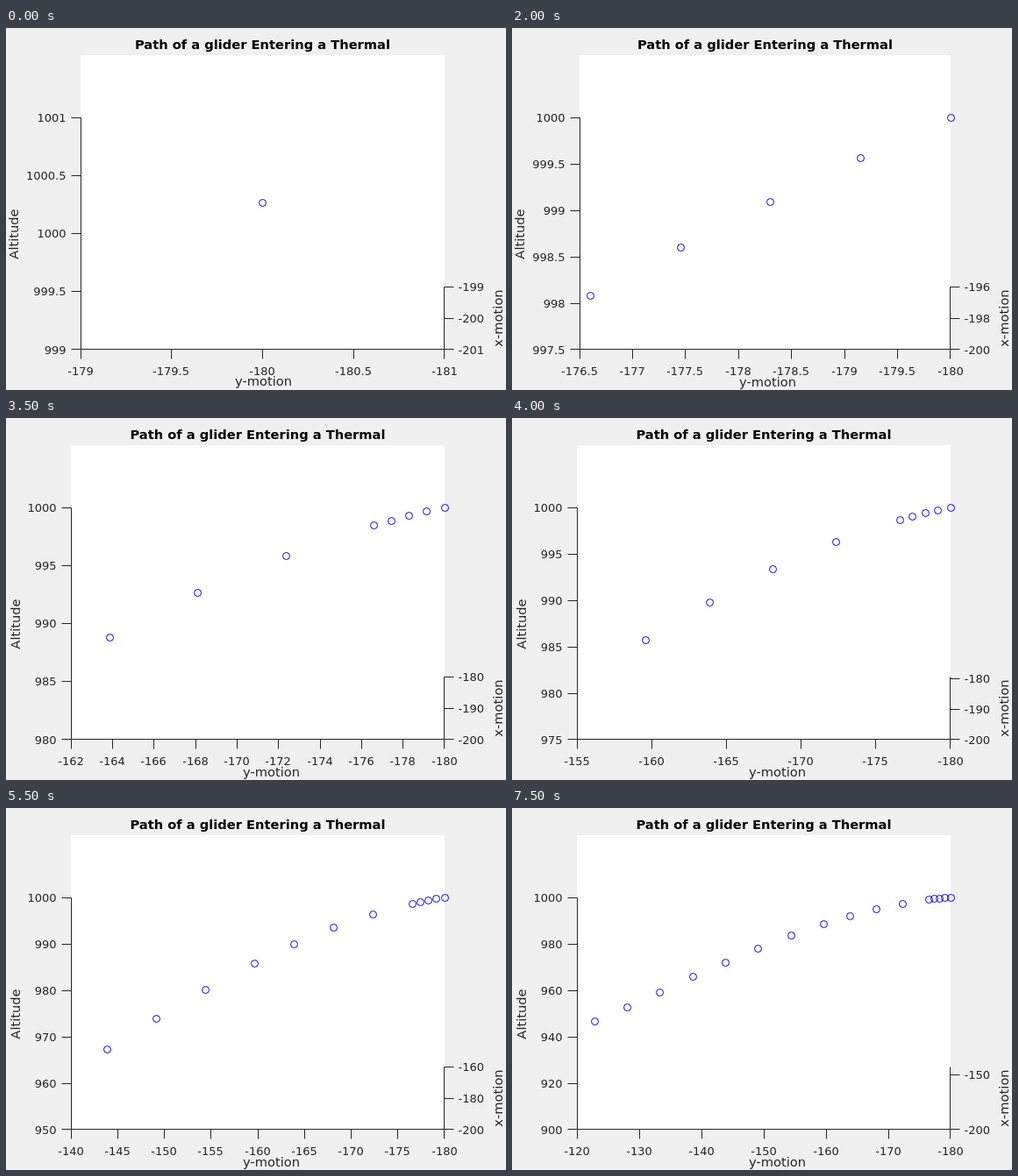
An HTML page that plays this animation: 570x413 px, repeating every 8000 ms.

```html
<!DOCTYPE html>
<html lang="en">
<head>
<meta charset="utf-8">
<title>Path of a glider Entering a Thermal</title>
<style>
html, body { margin: 0; width: 100%; height: 100%; overflow: hidden; background: #f0f0f0; }
svg { display: block; }
text { font: 13px "DejaVu Sans", sans-serif; fill: #262626; }
.label { font-size: 14.67px; text-anchor: middle; }
.title { font-weight: bold; fill: #000; }
path { fill: none; stroke: #262626; }
circle { fill: none; stroke: #00f; }
</style>
</head>
<body>
<svg id="plot" width="570" height="413" viewBox="0 0 570 413"></svg>
<script>
const plot = document.getElementById('plot');
const STEP_MS = 500, STEPS = 16;
const RIGHT = 500, BOTTOM = 367.07, HEIGHT = 265, DEPTH = 71.1;
const NICE = [.1, .2, .5, 1, 2, 5, 10, 20, 50];

// Height lost and distance flown (equal in x and y) at each step
const drops = [0, .579, 1.191, 1.825, 2.49, 6.21, 10.55, 15.55, 21.03,
               28.5, 36.53, 44.91, 53.7, 62.64, 71.7, 80.15];
const travel = i => i < 5 ? .8485 * i
                  : i < 9 ? 3.394 + 4.2426 * (i - 4)
                  : 20.365 + 5.257 * (i - 8);

const roundUp = (v, step) => Math.ceil(v / step - 1e-6) * step;

// Smallest round tick step that covers the data in at most max intervals
function fit(data, max) {
  const step = NICE.find(s => Math.ceil(data / s - 1e-6) <= max);
  return { range: roundUp(data, step), step };
}

function fitDepth(data) {
  const step = NICE.find(s => s >= 1 && data / s <= 2.05);
  const full = roundUp(data, step);
  return { range: full / data < 1.28 ? full : data, step };
}

function axesFor(n) {
  if (!n) return {
    x: { from: -201, range: 2, step: 1 },
    y: { from: -181, range: 2, step: .5 },
    z: { from: 999, range: 2, step: .5 }
  };
  const x = fitDepth(travel(n)), y = fit(travel(n), 9), z = fit(drops[n], 7);
  if (y.step < 1 && 423 * y.step / y.range < 50) y.step = NICE[NICE.indexOf(y.step) + 1];
  x.from = -200;
  y.from = -180;
  z.from = 1000 - z.range;
  return { x, y, z };
}

// Calls draw(label, fraction along the axis) for every tick
function ticks({ from, range, step }, draw) {
  let out = '';
  for (let k = 0; k * step <= range + 1e-6; k++)
    out += draw(+(from + k * step).toFixed(1), k * step / range);
  return out;
}

const line = d => `<path d="${d}"/>`;
const text = (x, y, s, attrs = '') => `<text x="${x}" y="${y}" ${attrs}>${s}</text>`;
const label = (x, y, s, cls = '') => text(x, y, s, `class="label ${cls}"`);
const upright = (x, y, s) => `<g transform="translate(${x} ${y}) rotate(-90)">${label(0, 0, s)}</g>`;
const pixel = v => Math.floor(v + 1e-6) + .5;

function scene(n) {
  const { x, y, z } = axesFor(n);
  const left = n == 0 ? 85 : n < 5 ? 77 : 74;
  const width = RIGHT - left;
  const l = left + .5, r = RIGHT - .5, b = pixel(BOTTOM) - 1;
  let out = `<rect x="${left}" y="31" width="${width}" height="336" fill="#fff"/>`;
  out += line(`M${l} ${pixel(BOTTOM - HEIGHT)}V${b}H${r}V${pixel(BOTTOM - DEPTH)}`);

  out += ticks(z, (s, f) => {
    const py = pixel(BOTTOM - HEIGHT * f);
    return line(`M${l} ${Math.min(py, b)}h-11`)
         + text(left - 16.5, py + 4.5, s, 'text-anchor="end"');
  });
  out += ticks(y, (s, f) => {
    const px = pixel(RIGHT - width * f);
    return line(`M${Math.min(px, r)} ${b}v11`) + text(px - .5, 396, s, 'text-anchor="middle"');
  });
  out += ticks(x, (s, f) => {
    const py = pixel(BOTTOM - DEPTH * f);
    return line(`M${r} ${Math.min(py, b)}h11`) + text(515.5, py + 4.5, s);
  });

  for (let i = 0; i <= n; i++) {
    const d = travel(i);
    const px = RIGHT - width * (d - 180 - y.from) / y.range;
    const py = BOTTOM - HEIGHT * (1000 - drops[i] - z.from) / z.range
                      - DEPTH * (d - 200 - x.from) / x.range;
    out += `<circle cx="${pixel(px)}" cy="${pixel(py)}" r="4"/>`;
  }

  out += label((left + RIGHT) / 2, 24, 'Path of a glider Entering a Thermal', 'title');
  out += label(n == 0 ? 293.5 : n < 5 ? 291.5 : 302.5, n < 2 ? 408 : 409, 'y-motion');
  out += upright(z.step >= 1 ? 16 : z.step < .5 ? 15 : 14, 235, 'Altitude');
  out += upright(566, 331, 'x-motion');
  return out;
}

let shown = -1;
function frame(now) {
  const n = Math.floor(now / STEP_MS) % STEPS;
  if (n != shown) plot.innerHTML = scene(shown = n);
  requestAnimationFrame(frame);
}
frame(0);
</script>
</body>
</html>
```
